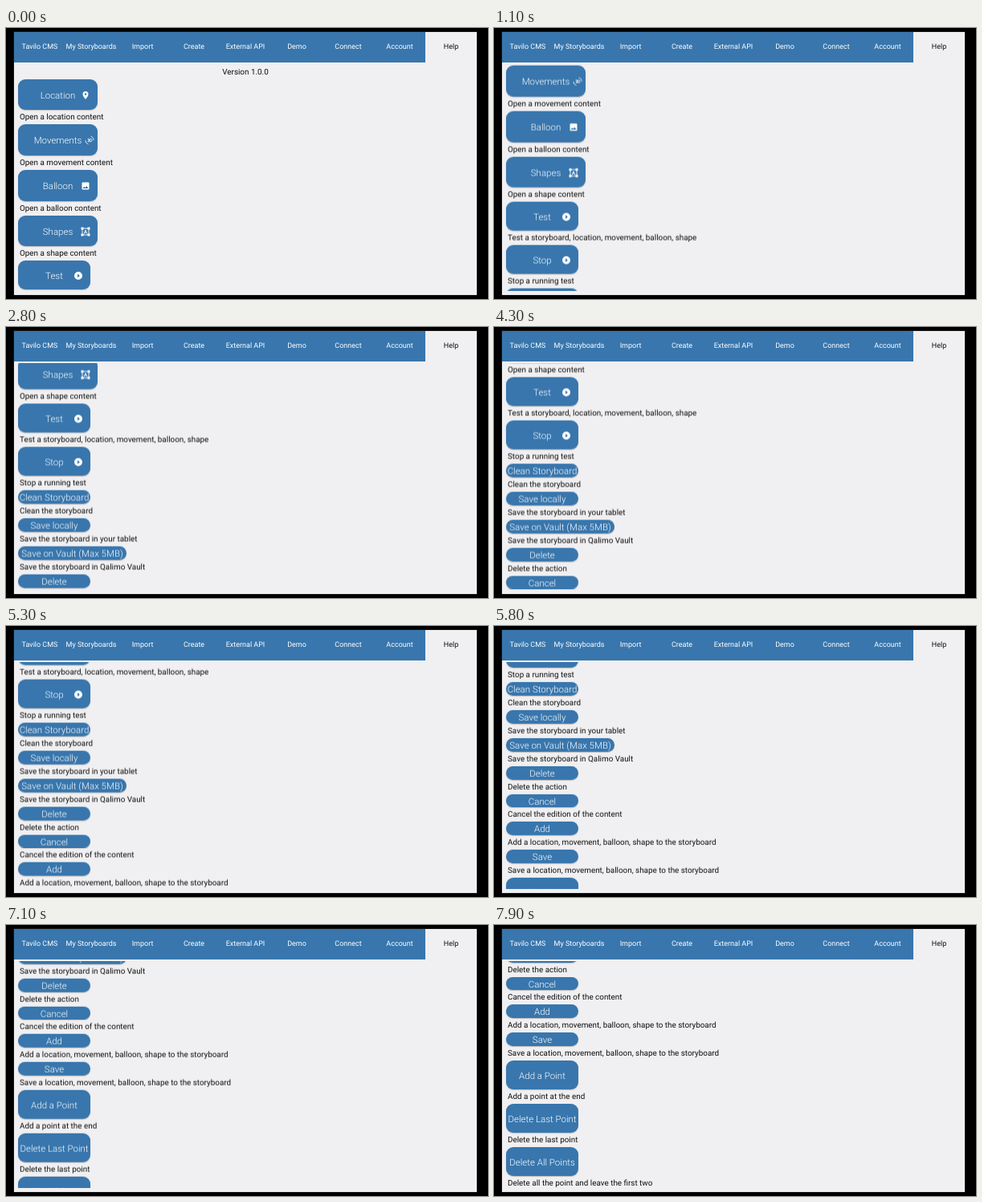
Animation of 600 by 338 pixels, one loop 8000 ms. Source, as an HTML page:

```html
<!DOCTYPE html>
<html lang="en">
<head>
<meta charset="utf-8">
<title>Help</title>
<style>
  html, body { margin: 0; width: 100%; height: 100%; overflow: hidden; background: #000; }
  body {
    position: relative; font: 9.9px/18px Roboto, sans-serif; color: #101010;
    white-space: nowrap; text-rendering: geometricPrecision;
  }

  .panel {
    position: absolute; left: 10px; top: 5px; width: 576px; height: 328px;
    background: #f0eff1; box-shadow: 0 0 1px rgba(240, 239, 241, .5);
  }
  .tabs { display: flex; height: 38px; font-size: 9px; line-height: 39px; }
  .tabs span { width: 64px; display: flex; justify-content: center; background: #3876ad; color: #fff; }
  .tabs .on { background: none; color: #101010; }

  .view { position: absolute; left: 0; top: 40px; width: 576px; height: 283px; overflow: hidden; }
  .list { padding: .7px 5px 0; animation: scroll 8s infinite; }
  .version { height: 18px; line-height: 19px; text-align: center; }
  .caption { height: 18px; line-height: 20.5px; padding-left: 2px; }

  .btn {
    position: relative; display: flex; align-items: center; justify-content: center;
    box-sizing: border-box; width: 90px; height: 36px; padding-top: 1px; border-radius: 9px;
    background: #3876ad; color: #fff; font-size: 11.5px; font-weight: 300;
    box-shadow: 0 1px 1px rgba(0, 0, 0, .22);
  }
  .big { width: 99px; height: 38.7px; }
  .small { height: 16.8px; }
  .wide { width: 135px; }
  .btn svg { position: absolute; right: 9px; width: 12px; height: 12px; fill: #fff; }
  .btn .edge { right: 4px; }

  @keyframes scroll {
    0%     { transform: translateY(0); animation-timing-function: steps(3); }
    3.75%  { transform: translateY(-12px); animation-timing-function: steps(17); }
    25%    { transform: translateY(-142.5px); animation-timing-function: steps(8); }
    35%    { transform: translateY(-194.5px); animation-timing-function: steps(4); }
    40%    { transform: translateY(-212.8px); animation-timing-function: steps(4); }
    45%    { transform: translateY(-223.8px); animation-timing-function: steps(4); }
    50%    { transform: translateY(-227.5px); }
    57.5%  { transform: translateY(-227.5px); animation-timing-function: steps(7); }
    66.25% { transform: translateY(-277.5px); animation-timing-function: steps(11); }
    80%    { transform: translateY(-389px); animation-timing-function: steps(8); }
    90%    { transform: translateY(-443px); animation-timing-function: steps(7); }
    98.75%, 100% { transform: translateY(-473px); }
  }
</style>
</head>
<body>
<div class="panel">
  <div class="tabs">
    <span>Tavilo CMS</span><span>My Storyboards</span><span>Import</span><span>Create</span><span>External API</span><span>Demo</span><span>Connect</span><span>Account</span><span class="on">Help</span>
  </div>
  <div class="view"><div class="list" id="list"><div class="version">Version 1.0.0</div></div></div>
</div>
<script>
  const icons = {
    pin: '<path fill-rule="evenodd" d="M12 2a7 7 0 0 0-7 7c0 5 7 13 7 13s7-8 7-13a7 7 0 0 0-7-7zm0 4.5a2.5 2.5 0 1 1 0 5 2.5 2.5 0 0 1 0-5z"/>',
    spin: '<g fill="none" stroke="#fff" stroke-width="1.5"><path d="M9 22A10.5 10.5 0 0 1 1.500 12M15 2A10.5 10.5 0 0 1 22.500 12"/><path d="M7 8.500h4v7H7M8 12h3M13.500 8.500v7H15a3 3 0 0 0 3-3v-1a3 3 0 0 0-3-3z"/></g>',
    image: '<path fill-rule="evenodd" d="M5 3h14a2 2 0 0 1 2 2v14a2 2 0 0 1-2 2H5a2 2 0 0 1-2-2V5a2 2 0 0 1 2-2zM5 18h14l-4.5-6-3.5 4.5-2.5-3z"/>',
    shape: '<g fill="none" stroke="#fff" stroke-width="1.8"><path d="M4 4h16v16H4z"/><path d="M8.500 17l3.500-9 3.500 9M10 14h4"/></g><path d="M1 1h6v6H1zM17 1h6v6h-6zM1 17h6v6H1zM17 17h6v6h-6z"/>',
    play: '<path fill-rule="evenodd" d="M12 2a10 10 0 1 1 0 20 10 10 0 0 1 0-20zM10 7.5v9l6-4.5z"/>'
  };

  // label, caption, classes, icon
  const rows = [
    ['Location', 'Open a location content', 'big', 'pin'],
    ['Movements', 'Open a movement content', 'big', 'spin'],
    ['Balloon', 'Open a balloon content', 'big', 'image'],
    ['Shapes', 'Open a shape content', 'big', 'shape'],
    ['Test', 'Test a storyboard, location, movement, balloon, shape', '', 'play'],
    ['Stop', 'Stop a running test', '', 'play'],
    ['Clean Storyboard', 'Clean the storyboard', 'small'],
    ['Save locally', 'Save the storyboard in your tablet', 'small'],
    ['Save on Vault (Max 5MB)', 'Save the storyboard in Qalimo Vault', 'small wide'],
    ['Delete', 'Delete the action', 'small'],
    ['Cancel', 'Cancel the edition of the content', 'small'],
    ['Add', 'Add a location, movement, balloon, shape to the storyboard', 'small'],
    ['Save', 'Save a location, movement, balloon, shape to the storyboard', 'small'],
    ['Add a Point', 'Add a point at the end', ''],
    ['Delete Last Point', 'Delete the last point', ''],
    ['Delete All Points', 'Delete all the point and leave the first two', '']
  ];

  const drawIcon = name => name
    ? `<svg viewBox="0 0 24 24" class="${name === 'spin' ? 'edge' : ''}">${icons[name]}</svg>` : '';

  document.getElementById('list').insertAdjacentHTML('beforeend', rows.map(([label, caption, kind, icon]) =>
    `<div class="btn ${kind}">${label}${drawIcon(icon)}</div><div class="caption">${caption}</div>`).join(''));
</script>
</body>
</html>
```
